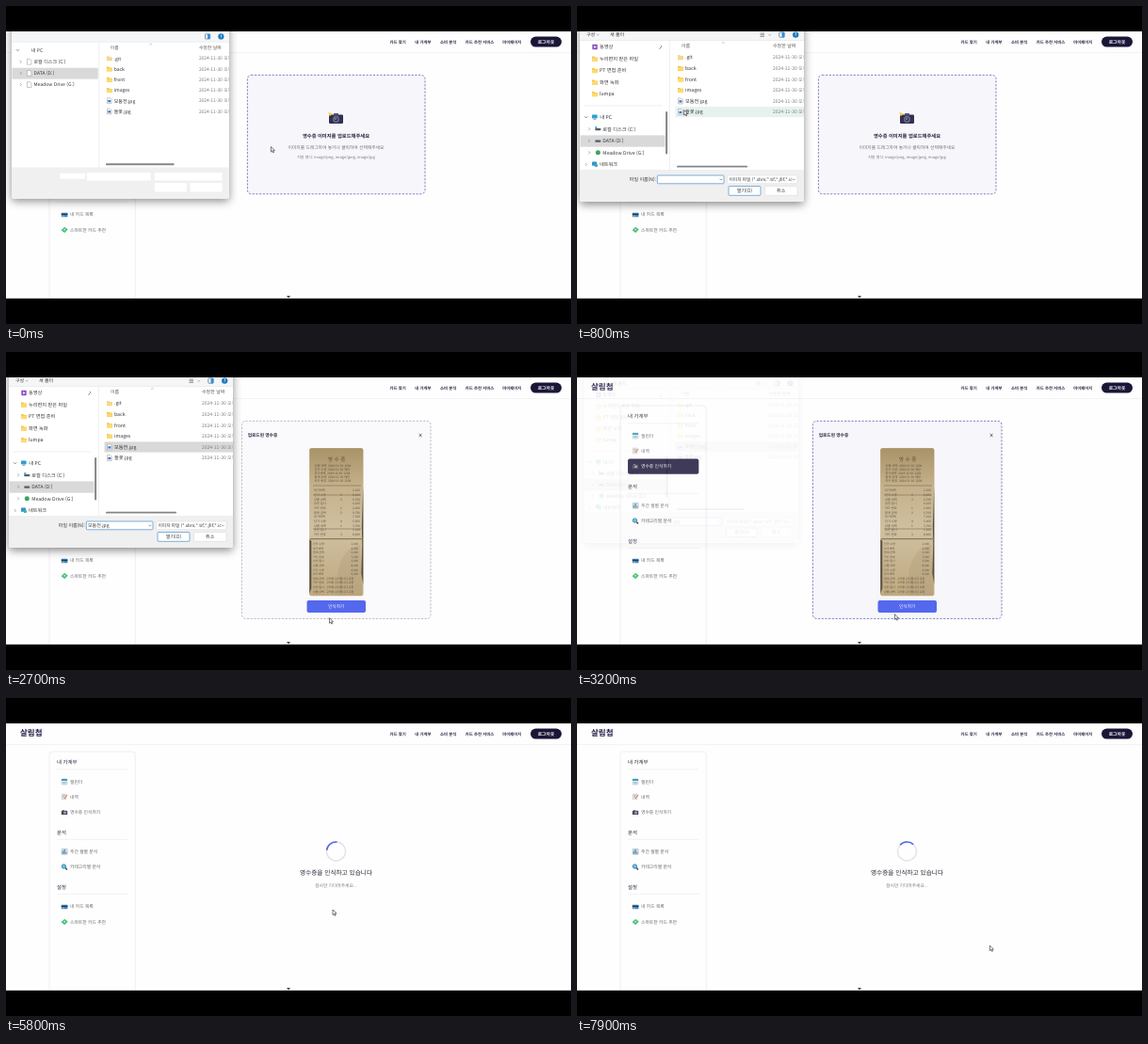
Write an HTML page that moves like this. It is 600x338 px and loops after 8 s.

```html
<!DOCTYPE html>
<html lang="ko">
<head>
<meta charset="utf-8">
<title>영수증 업로드</title>
<style>
html, body { margin: 0; width: 100%; height: 100%; overflow: hidden; background: #000; }
svg { display: block; width: 600px; height: 338px; }
text { font-family: "Noto Sans CJK KR", "Noto Sans CJK", "Noto Sans", sans-serif; text-rendering: geometricPrecision; white-space: pre; }
</style>
</head>
<body>
<svg id="stage" viewBox="0 0 600 338"></svg>
<script>
const LOOP = 8000, BLUE = '#5468ee', INK = '#211d45';

// Shape helpers; text is placed by its vertical middle.
const text = (x, y, size, str, fill = '#444', weight = 400, anchor = 'start') =>
  `<text x="${x}" y="${y + size * .36}" font-size="${size}" fill="${fill}" font-weight="${weight}" text-anchor="${anchor}">${str}</text>`;
const mid = (x, y, size, str, fill, weight) => text(x, y, size, str, fill, weight, 'middle');
const rect = (x, y, w, h, fill, r = 0, more = '') =>
  `<rect x="${x}" y="${y}" width="${w}" height="${h}" rx="${r}" fill="${fill}" ${more}/>`;
const path = (d, stroke, width = .6, fill = 'none') =>
  `<path d="${d}" stroke="${stroke}" stroke-width="${width}" fill="${fill}"/>`;
const circle = (x, y, r, fill, more = '') => `<circle cx="${x}" cy="${y}" r="${r}" fill="${fill}" ${more}/>`;
const group = (id, body, more = '') => `<g id="${id}" ${more}>${body}</g>`;
const line = (stroke, width = .6) => `stroke="${stroke}" stroke-width="${width}"`;

function header() {
  const nav = [[407.5, '카드 찾기'], [434.3, '내 가계부'], [461, '소비 분석'], [487.8, '카드 추천 서비스'], [527.3, '마이페이지']];
  return text(15, 37.3, 8.5, '살림첩', INK, 700) +
    nav.map(([x, s]) => text(x, 38, 4.35, s, '#292742', 700)).join('') +
    rect(557, 32.6, 33, 11, '#191637', 5.5) + mid(573.5, 38.1, 4.8, '로그아웃', '#fff', 700) +
    path('M0 49.5H600', '#ececf0', .6);
}

const icons = {
  calendar: y => rect(59, y - 3, 6, 6, '#e8eef2', .7, line('#8ab', .4)) + rect(59, y - 3, 6, 2, '#3b9cc4', .5) + path(`M60 ${y + .5}h4M60 ${y + 1.8}h4`, '#7a8f9a', .5),
  memo: y => rect(59, y - 3, 5, 6, '#e4e4e4', .4, line('#aaa', .3)) + path(`M60 ${y - 1.3}h3M60 ${y + .2}h2`, '#888', .5) + path(`M65 ${y - 2}l-3 4`, '#c96a48', 1),
  camera: y => rect(58.8, y - 1.7, 6.4, 4.2, '#4b4b55', .6) + rect(60, y - 2.5, 2, 1, '#777') + circle(62.5, y + .4, 1.3, '#9ac'),
  chart: y => rect(59, y - 3, 6.2, 6, '#cfe3ec', .5, line('#6aa3bd', .4)) + path(`M60.3 ${y + 2.4}v-3`, '#2a9d5c', 1) + path(`M62.1 ${y + 2.4}v-4.8`, '#305da8', 1) + path(`M63.9 ${y + 2.4}v-2`, '#d45a4a', 1),
  lens: y => path(`M63 ${y + .8}l2 2`, '#26394a', 1.3) + circle(61.4, y - .7, 2.2, '#6ec5e6', line('#2878a8', .8)),
  card: y => rect(58.8, y - 1.8, 6.6, 4.4, '#3c86c4', .5) + rect(58.8, y - .8, 6.6, 1.2, '#26384e') + rect(59.6, y + 1.2, 2.5, .6, '#f0d070'),
  money: y => path(`M59 ${y + .5}l3-3 3.3 2.3-3 3.2z`, '#22a45b', .5, '#45c878') + circle(62.2, y - .1, .9, '#c8f0d0')
};

function sidebar() {
  const heads = [[68.5, '내 가계부'], [143, '분석'], [201, '설정']];
  const items = [[89, 'calendar', '캘린더'], [105, 'memo', '내역'], [121.5, 'camera', '영수증 인식하기'], [163.3, 'chart', '주간 월별 분석'],
    [179.7, 'lens', '카테고리별 분석'], [221.6, 'card', '내 카드 목록'], [237.8, 'money', '스마트한 카드 추천']];
  return rect(46, 57, 91.3, 260, '#fefefe', 3, line('#ebebf0', .8)) +
    heads.map(([y, s]) => text(54, y, 5.4, s, '#29263f', 500) + path(`M54 ${y + 7.3}h75`, '#e8e8ec', .6)).join('') +
    items.map(([y, icon, s]) => icons[icon](y) + text(68, y, 4.8, s, '#666')).join('') +
    group('active', rect(54, 113.5, 75.3, 16.2, '#2a2346', 2) + icons.camera(121.5) + text(68, 121.5, 4.8, '영수증 인식하기', '#fff', 500));
}

const dashed = (id, x, y, w, h) => rect(x, y, w, h, '#f6f6fb', 4, `id="${id}" stroke="#5e68ad" stroke-width=".8" stroke-dasharray="2.2 1.5"`);

function uploader() {
  return dashed('drop', 256.4, 73.4, 188.6, 126.4) +
    rect(343, 115.5, 15, 9.5, '#33304f', 1.2) + rect(348, 114, 5, 2.5, '#55527a', .5) +
    path('M342.5 113.2l4 1.3-2.6 2.4z', '#e8c030', .3, '#f4d748') + circle(350.5, 120.5, 3.4, '#77749b') +
    circle(350.5, 120.5, 2.2, '#2b3f66') + circle(350, 120, .8, '#b9c86a') +
    mid(350.5, 138, 5.3, '영수증 이미지를 업로드해주세요', '#25223d', 700) +
    mid(350.5, 150, 4.78, '이미지를 드래그하여 놓거나 클릭하여 선택해주세요', '#6f6f78') +
    mid(350.5, 160.5, 4, '지원 형식: image/png, image/jpeg, image/jpg', '#777780');
}

function receipt() {
  const words = ['상품 내역', '단가 수량', '부가세액', '합계 금액', '카드 번호', '승인 일시'];
  const ink = '#5c503c';
  let out = mid(351, 113.5, 5.6, '영 수 증', ink, 500);
  for (let i = 0; i < 5; i++) out += text(327.5, 121 + i * 4, 3.2, words[i] + ': 2024-11-30' + (i % 2 ? ' 매장' : ' 1204'), ink);
  for (let i = 0; i < 11; i++) {
    const y = 147 + i * 4.7;
    out += text(327, y, 3.2, words[(i * 5 + 2) % 6], ink) +
      (i % 3 ? text(355, y, 3.2, i % 4 + 1, ink) : '') + text(376, y, 3.2, `${(i * 7) % 9 + 1},${(i * 3) % 9 + 1}00`, ink, 500, 'end');
  }
  for (let i = 0; i < 12; i++) {
    const y = 204 + i * 4.6;
    out += text(326, y, 3, words[(i * 7 + 1) % 6], ink) +
      (i < 8 ? text(374, y, 3, `${(i * 5) % 9 + 1},000`, ink, 400, 'end') : text(340, y, 3, '고객용 감사합니다 교환', ink));
  }
  return rect(322.3, 102.3, 57, 156.5, '#c9b793', 2) + rect(322.3, 102.3, 57, 157, 'url(#paper)', 2) +
    path('M322.3 146v53l2 2v50l-2 6z', 'none', 0, '#5b5042') + path('M379.3 143l-1.5 42 .5 20-1 30 2 12z', 'none', 0, '#594e41') +
    path('M352 259q-4-48 24-54l2 54z', 'none', 0, '#a896764d') + out +
    path('M326 142H377M326 152H377M326 188H377', '#7a6a50', .6) + path('M323 198.7H379', '#8c7a5c', 1.2);
}

function preview() {
  return dashed('frame', 250.4, 73.4, 200.6, 210) +
    text(256.7, 88.3, 4.7, '업로드된 영수증', '#25223d', 700) +
    path('M438.7 87.1l2.8 2.8m0-2.8l-2.8 2.8', '#333', .8) + receipt() +
    rect(319.5, 264, 62.5, 13, BLUE, 2) + mid(350.7, 270.5, 4.75, '인식하기', '#fff', 500);
}

function loading() {
  return circle(350.5, 163, 10, 'none', line('#e2e2e8', 1.4)) +
    group('spin', path('M343.43 155.93A10 10 0 0 1 357.57 155.93', BLUE, 1.5)) +
    mid(350.5, 185.3, 6.65, '영수증을 인식하고 있습니다', '#25232f', 500) +
    mid(350.5, 199.2, 4.75, '잠시만 기다려주세요...', '#7b7b83');
}

const folder = (x, y, fill = '#f5c84c') => path(`M${x} ${y - 2.5}h2.3l.8.9h2.9v4.3h-6z`, 'none', 0, fill) + rect(x, y - .8, 6, 3.2, '#ffd970', .4, fill === '#f5c84c' ? '' : 'opacity=".5"');
const sheet = (x, y) => path(`M${x + .6} ${y - 3}h3.2l1.4 1.4v4.6h-4.6z`, '#8f8f96', .5, '#fff');
const picture = (x, y) => sheet(x, y) + rect(x + 1.4, y - .8, 3, 2.4, '#3f7fc0');
const drive = (x, y) => rect(x, y - .8, 6, 2.2, '#555b62', .4) + rect(x + 4.6, y, .7, .6, '#5fd08a');

// Folder tree; the plain state has generic icons and starts further down the list.
function tree(plain) {
  const dy = plain ? -72.5 : 0;
  const quick = ['동영상', '누리편지 받은 파일', 'PT 면접 준비', '화면 녹화', 'lumpa'];
  const pc = [['로컬 디스크 (C:)', (x, y) => drive(x, y) + rect(x, y - 2.6, 2, 2, '#35a0dc')], ['DATA (D:)', drive],
    ['Meadow Drive (G:)', (x, y) => circle(x + 3, y, 2.5, '#3aa55d')]];
  let out = rect(3.5, 137.4 + dy, plain ? 94 : 90, 12.3, '#d9d9d9');
  if (!plain) {
    quick.forEach((s, i) => {
      const y = 43.5 + i * 12.5;
      out += (i ? folder(16, y) : rect(16.3, y - 2.7, 5.4, 5.4, '#8a4fc4', .8) + path(`M18.2 ${y - 1.4}l2.4 1.4-2.4 1.4z`, 'none', 0, '#fff')) + text(24, y, 5.2, s, '#333');
    });
    out += path('M88.8 41.8l1.3 1.4-2.3 1.8m1.1-1l-1.6 1.8', '#777', .7) + path('M8 106H90', '#e2e2e2', .6) +
      rect(16, 165.6, 5, 4.2, '#3a8fd0', .4) + circle(20.3, 169.5, 1.8, '#39b3a2') + text(24, 168.5, 5.2, '네트워크', '#333') +
      path('M8.8 167l1.5 1.5-1.5 1.5', '#777') + rect(94.1, 112, 2, 45.5, '#858585', 1);
  }
  out += path(`M8 ${117.3 + dy}l1.6 1.6 1.6-1.6`, '#555', .7) + (plain ? '' : rect(16, 115.5, 5.6, 4, '#2e9fd8', .4) + rect(17.5, 120, 2.6, .6, '#567')) +
    text(24.3, 118 + dy, 5.2, '내 PC', '#333');
  pc.forEach(([s, icon], i) => {
    const y = 130.8 + i * 12.5 + dy;
    out += path(`M12.2 ${y - 1.5}l1.5 1.5-1.5 1.5`, '#777') + (plain ? sheet : icon)(19.3, y) + text(27.2, y, 5.2, s, '#333');
  });
  return `<g clip-path="url(#tree)">${out}</g>`;
}

const rowY = i => 54.6 + i * 11.6;

function dialog() {
  const files = ['.git', 'back', 'front', 'images', '모둠전.jpg', '들꽃.jpg'];
  const box = (x, y, w, h) => rect(x, y, w, h, '#fff', .8, line('#d4d4d8', .5));
  const list = files.map((s, i) => {
    const y = rowY(i);
    return (i < 4 ? folder(107, y, i ? undefined : '#ead9a0') : picture(107, y)) + text(115, y, 5.2, s, '#333') + text(208, y, 5, '2024-11-30 오후 5:21', '#7a7a7a');
  }).join('');
  const full = text(10, 30.6, 5, '구성', '#333') + path('M21 30l1.2 1.2 1.2-1.2', '#666', .5) + text(35, 30.6, 5, '새 폴더', '#333') +
    path('M194.5 29h4.5M194.5 30.7h4.5M194.5 32.4h4.5', '#666', .7) + path('M203.5 30.2l1.2 1.2 1.2-1.2', '#666', .5) + tree(false) +
    text(84, 184.3, 5, '파일 이름(N):', '#333', 400, 'end') + rect(85.3, 180, 70.7, 8.8, '#fff', .8, line('#4b8fc9', .7)) + path('M151.5 183.8l1.3 1.3 1.3-1.3', '#555', .6) +
    box(159.3, 180, 74.7, 8.8) + text(161.5, 184.3, 4.7, '이미지 파일 (*.xbm;*.tif;*.jfif;*.ic', '#333') + path('M229 183.8l1.3 1.3 1.3-1.3', '#555', .6) +
    rect(161, 191.5, 34, 9.8, '#fff', 1, line('#4b8fc9', .7)) + mid(178, 196.4, 5, '열기(O)', '#333') +
    box(199.5, 191.5, 34.5, 9.8) + mid(216.7, 196.4, 5, '취소', '#333') + group('filename', text(87, 184.3, 5, '모둠전.jpg', '#333'));
  const bare = tree(true) + rect(55.5, 180.5, 28, 6, '#fff') + rect(85.3, 179.8, 70, 8.6, '#fff') + rect(159.5, 179.8, 74, 8.6, '#fff') + rect(159.5, 191, 35, 9.8, '#fff') + rect(198.5, 191, 35, 9.8, '#fff');
  return rect(3, 10, 238, 198, '#fff', 3, 'filter="url(#shade)"') + rect(3, 10, 238, 26.5, '#f5f6f8') +
    path('M3 36.5H241', '#e4e4e6', .6) + path('M98.5 37V174', '#e4e4e6', .6) +
    path('M3 174H241V205q0 3-3 3H6q-3 0-3-3z', 'none', 0, '#f0f0f1') +
    rect(214.8, 28, 5.4, 5.2, '#fff', .6, line('#37698f', .7)) + rect(217.5, 28, 2.7, 5.2, '#2f8fd8') +
    circle(232.2, 30.6, 3.2, '#1d7ac0') + mid(232.2, 30.6, 4.6, '?', '#fff', 700) +
    rect(104.5, 0, 136.5, 11.2, '#e7f2ee', 0, 'id="hover"') + rect(104.5, rowY(4) - 5.6, 136.5, 11.2, '#d9d9d9', 0, 'id="selected"') +
    `<g clip-path="url(#files)">${text(111, 42.3, 5, '이름', '#555')}${text(208, 42.3, 5, '수정한 날짜', '#555')}${list}</g>` +
    path('M154 39.6l1.4-1.3 1.4 1.3', '#888', .5) + rect(106, 169.7, 75, 1.9, '#858585', .9) +
    group('full', full) + group('bare', bare);
}

const stage = document.getElementById('stage');
stage.innerHTML = `<defs>
  <clipPath id="screen"><rect y="27" width="600" height="284"/></clipPath>
  <clipPath id="tree"><rect x="3" y="37" width="95" height="136"/></clipPath>
  <clipPath id="files"><rect x="99" y="37" width="142" height="136"/></clipPath>
  <linearGradient id="paper" x2="0" y2="1"><stop stop-color="#a99368"/><stop offset=".25" stop-color="#c4b08a"/><stop offset=".55" stop-color="#cfc0a0"/><stop offset="1" stop-color="#bfa980"/></linearGradient>
  <filter id="shade" x="-20%" y="-20%" width="140%" height="140%"><feDropShadow dx="0" dy="3" stdDeviation="5" flood-opacity=".45"/></filter>
</defs>` + rect(0, 0, 600, 338, '#000') +
  `<g clip-path="url(#screen)">${rect(0, 27, 600, 284, '#fefeff')}${sidebar()}${header()}
  ${group('upload', uploader())}${group('preview', preview())}${group('loading', loading())}${group('dialog', dialog())}
  ${path('M298 308h4l-2 2.4z', 'none', 0, '#444')}${path('M0 310.8H600', '#5b7a62', .4)}
  ${group('cursor', path('M0 0V5.6L1.3 4.4 2.2 6.4 3.1 6 2.2 4.1H4z', '#222', .6, '#fff'))}</g>`;

const el = id => document.getElementById(id);
const show = (id, on) => el(id).setAttribute('visibility', on ? 'inherit' : 'hidden');
const clamp = v => Math.min(1, Math.max(0, v));
const ease = p => p * p * (3 - 2 * p);

// Pointer stops: time, x, y.
const stops = [[0, 281.4, 149.5], [150, 281.4, 149.5], [700, 113.6, 110.5], [850, 113.6, 110.5], [1000, 118, 100], [1250, 119, 100],
  [1600, 346.6, 176], [2000, 350, 215], [2600, 344, 283], [3200, 337.4, 278.7], [3550, 341, 270], [3850, 341, 269],
  [4400, 338.4, 222.8], [5000, 341, 224], [5800, 347, 225], [6300, 354, 245], [7300, 425, 262], [7900, 438.4, 263], [8000, 438.4, 263]];

function pointer(t) {
  const i = stops.findIndex(s => s[0] > t), a = stops[i - 1], b = stops[i];
  const p = ease((t - a[0]) / (b[0] - a[0]));
  return [a[1] + (b[1] - a[1]) * p, a[2] + (b[2] - a[2]) * p];
}

function draw(t) {
  const [x, y] = pointer(t);
  el('cursor').setAttribute('transform', `translate(${x} ${y})`);

  show('upload', t < 1400);
  show('preview', t >= 1400 && t < 3800);
  show('loading', t >= 3800);
  show('active', t < 3800);
  const over = t >= 3000;
  el('frame').setAttribute('stroke', over ? '#5e68ad' : '#a8abb4');
  el('frame').setAttribute('fill', over ? '#f6f6fb' : '#fafafc');
  el('spin').setAttribute('transform', `rotate(${t * .36 + 33} 350.5 163)`);

  const open = ease(clamp(t / 100)), close = clamp((t - 2950) / 280);
  const scale = close ? 1 - .05 * close : .97 + .03 * open;
  el('dialog').setAttribute('transform', `translate(104 92) scale(${scale}) translate(-104 -92)`);
  el('dialog').setAttribute('opacity', 1 - close);
  show('dialog', close < 1);
  show('bare', t < 200);
  show('full', t >= 200);
  const row = Math.round((y + .5 - rowY(0)) / 11.6), picked = t >= 1050;
  show('hover', t >= 200 && x > 104 && x < 241 && row >= 0 && row < 6 && !(picked && row === 4));
  el('hover').setAttribute('y', rowY(row) - 5.6);
  show('selected', picked);
  show('filename', picked);
}

const start = performance.now();
function tick() {
  draw((performance.now() - start) % LOOP);
  requestAnimationFrame(tick);
}
tick();
</script>
</body>
</html>
```
